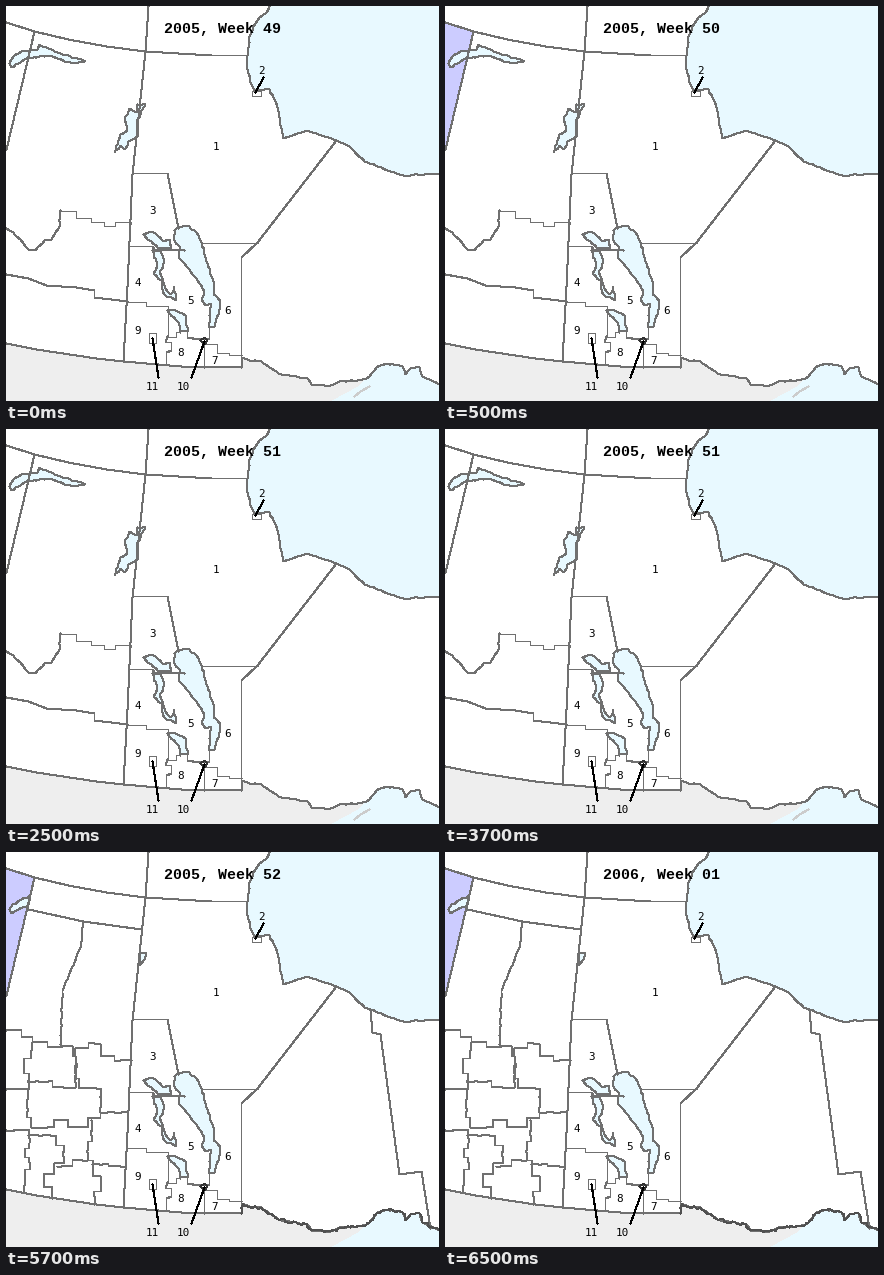
A matplotlib script that plays this animation: 433 px wide and 395 px high, repeating every 8 s.

```python
import numpy as np
import matplotlib.pyplot as plt
from matplotlib.animation import FuncAnimation

W, H, DPI = 433, 395, 64
PX = 72 / DPI
WATER, FOREIGN, ACTIVE = "#e8f9ff", "#eeeeee", "#ccccff"
LINE = "#707070"

fig = plt.figure(figsize=(W / DPI, H / DPI), dpi=DPI, facecolor="white")
ax = fig.add_axes([0, 0, 1, 1])
ax.set_xlim(-0.5, W - 0.5)
ax.set_ylim(H - 0.5, -0.5)
ax.axis("off")


def rough(points, amount=0.6, seed=1, step=3):
    """Break a path into short pieces and shake the inner points."""
    rng = np.random.default_rng(seed)
    pts = np.array(points, float)
    out = [pts[:1]]
    for a, b in zip(pts[:-1], pts[1:]):
        n = max(1, int(np.hypot(*(b - a)) / step))
        t = np.arange(1, n + 1)[:, None] / n
        piece = a + (b - a) * t
        piece[:-1] += rng.uniform(-amount, amount, (n - 1, 2))
        out.append(piece)
    return np.vstack(out)


def stairs(*points):
    """Join points by a horizontal, then a vertical run."""
    out = [points[0]]
    for x, y in points[1:]:
        out += [(x, out[-1][1]), (x, y)]
    return out


def line(points, color=LINE, z=3):
    x, y = np.array(points, float).T
    return ax.plot(x, y, color=color, lw=PX, antialiased=False,
                   solid_joinstyle="miter", zorder=z)[0]


def fill(points, color, z=1):
    x, y = np.array(points, float).T
    return ax.fill(x, y, color=color, lw=0, antialiased=False, zorder=z)[0]


def lake(*points, amount=0.8):
    shore = rough(points + points[:1], amount, len(points))
    return [fill(shore, WATER, 2), line(shore)]


def label(text, x, y, leader=None):
    ax.text(x, y, text, family="DejaVu Sans Mono", size=11 * PX,
            ha="center", va="center_baseline", zorder=5)
    if leader:
        line(leader, "black", 4)


def box(x, y, w, h):
    line([(x, y), (x + w, y), (x + w, y + h), (x, y + h), (x, y)])


# Northern sea
sea = rough([(263, 0), (259, 7), (253, 11), (247, 20), (243, 30), (241, 49),
             (240, 58), (244, 76), (248, 84), (263, 83), (271, 101),
             (277, 132), (300, 124), (330, 134), (343, 140), (358, 155),
             (397, 169), (433, 167)], 0.7, 4)
fill(np.vstack([sea, [(433, -1), (263, -1)]]), WATER)
line(sea)

# Southern border, the country below it and the great lake
border = [(0, 337), (30, 343), (90, 352), (117, 355), (175, 360), (235, 361)]
south_east = [(235, 361), (236, 351), (243, 354), (255, 355), (272, 367),
              (301, 372), (305, 378), (324, 379), (333, 375), (354, 374),
              (363, 370)]
lake_shore = [(363, 370), (370, 361), (379, 357), (396, 360), (399, 368),
              (404, 362), (413, 361), (416, 370), (433, 378)]
fill(border + south_east + lake_shore + [(433, 395), (0, 395)], FOREIGN)
fill(lake_shore + [(433, 395), (325, 395), (351, 381)], WATER, 1.5)
line(border)
line(rough(south_east + lake_shore))

# Provincial boundaries
line([(0, 16), (28, 25), (62, 33), (100, 40), (139, 45), (205, 49), (241, 49)])
line([(28, 25), (30, 0)]).set_visible(False)
line([(142, 0), (139, 45), (126, 168), (121, 280), (117, 355)])
line([(330, 134), (251, 236), (235, 251), (235, 361)])

# Numbered districts
line([(126, 167), (161, 167), (172, 222)])
line([(195, 236), (251, 236)])
line([(124, 240), (146, 240), (148, 243), (178, 244)])
line(stairs((121, 295), (139, 299), (161, 330), (169, 325), (173, 326)))
line([(161, 330), (159, 336), (165, 336), (165, 344), (160, 346), (160, 358)])
line([(181, 326), (181, 331), (192, 333), (203, 332), (203, 321)])
line(stairs((197, 361), (197, 337), (210, 346), (222, 348), (235, 348)))

# Inner lakes
lake((168, 224), (173, 220), (183, 220), (190, 226), (195, 236), (200, 255),
     (207, 275), (207, 288), (214, 294), (212, 308), (208, 320), (202, 321),
     (205, 297), (199, 299), (195, 293), (198, 285), (190, 272), (172, 250),
     (174, 241), (168, 234))
lake((137, 228), (146, 225), (156, 234), (164, 233), (165, 241), (152, 242))
lake((146, 244), (154, 244), (158, 254), (154, 264), (159, 282), (164, 288),
     (168, 280), (170, 294), (158, 288), (155, 274), (147, 267), (151, 259),
     amount=1)
lake((161, 304), (167, 303), (179, 309), (182, 325), (174, 325), (172, 316))

# Small districts and labels
box(245, 84, 9, 5)
box(142, 326, 7, 10)
line([(194, 334), (198, 331), (201, 334), (198, 338), (194, 334)], "#333333")
label("1", 209, 140)
label("2", 255, 64, [(257, 71), (249, 86)])
label("3", 146, 204)
label("4", 131, 275)
label("5", 184, 294)
label("6", 221, 303)
label("7", 208, 353)
label("8", 174, 346)
label("9", 131, 324)
label("10", 177, 379, [(198, 335), (185, 371)])
label("11", 146, 379, [(146, 332), (152, 371)])

west_edge = [(28, 25), (20, 59), (0, 143)]
line(west_edge)
active = fill([(-1, 16)] + west_edge + [(-1, 143)], ACTIVE)

# Coarse districts
coarse = [
    line(rough([(0, 222), (7, 226), (23, 244), (29, 244), (38, 234),
                (45, 233), (53, 220), (54, 204)])),
    line(stairs((54, 204), (69, 206), (69, 211), (84, 215), (97, 219),
                (108, 215), (124, 217))),
    line([(0, 268), (22, 272), (40, 279), (70, 281), (88, 284), (88, 291),
          (121, 295)]),
    line([(348, 390), (354, 385), (363, 380)], "#cccccc"),
]
coarse += lake((3, 57), (7, 50), (15, 45), (31, 43), (33, 38), (48, 45),
               (79, 55), (66, 57), (42, 49), (18, 53), (5, 61))
coarse += lake((131, 98), (139, 97), (131, 113), (131, 130), (122, 135),
               (118, 143), (114, 139), (108, 146), (114, 128), (121, 124),
               (118, 113), (123, 102), (130, 106), amount=1)

# Fine districts
fine = [
    line([(22, 57), (77, 69), (135, 77)]),
    line(rough([(77, 69), (74, 95), (56, 138), (54, 192)])),
    line([(364, 157), (366, 180), (374, 182), (393, 322), (415, 319),
          (424, 376)]),
    line(rough(south_east + lake_shore, 1.6, 15, 2), "#505050"),
]
fine += lake((3, 57), (6, 52), (24, 43), (22, 52), (5, 61))
fine += lake((133, 101), (139, 100), (138, 107), (133, 113))


def district(*points):
    fine.append(line(rough(stairs(*points), 0.8, len(points), 4)))


district((0, 178), (15, 184), (26, 190), (41, 194), (66, 204), (70, 226))
district((26, 190), (25, 206), (18, 221), (22, 237), (0, 237))
district((22, 229), (46, 235), (69, 196), (82, 191), (94, 203), (108, 208),
         (125, 208))
district((70, 226), (72, 236), (94, 260), (121, 260))
district((18, 237), (21, 265), (25, 275), (47, 267), (61, 275), (81, 265),
         (94, 260))
district((0, 278), (23, 296), (18, 305), (23, 317), (18, 340))
district((22, 283), (50, 293), (57, 311), (48, 321), (38, 335), (46, 346))
district((50, 314), (66, 308), (81, 289), (85, 268))
district((80, 308), (86, 324), (94, 339), (88, 352))
district((86, 312), (102, 314), (119, 314))

title = ax.text(157.5, 26, "", family="Liberation Mono", weight="bold",
                size=15 * PX, ha="left", va="baseline", zorder=5)


def update(i):
    week = 49 + (i >= 1) + (i >= 5) + (i >= 9) + (i >= 13)
    year, week = (2006, week - 52) if week > 52 else (2005, week)
    detailed = i >= 9
    title.set_text(f"{year}, Week {week:02d}")
    active.set_visible(detailed or 1 <= i < 5)
    for artist in coarse:
        artist.set_visible(not detailed)
    for artist in fine:
        artist.set_visible(detailed)
    return [title, active, *coarse, *fine]


anim = FuncAnimation(fig, update, frames=16, interval=500, repeat=True,
                     repeat_delay=0, blit=False)
plt.show()
```
